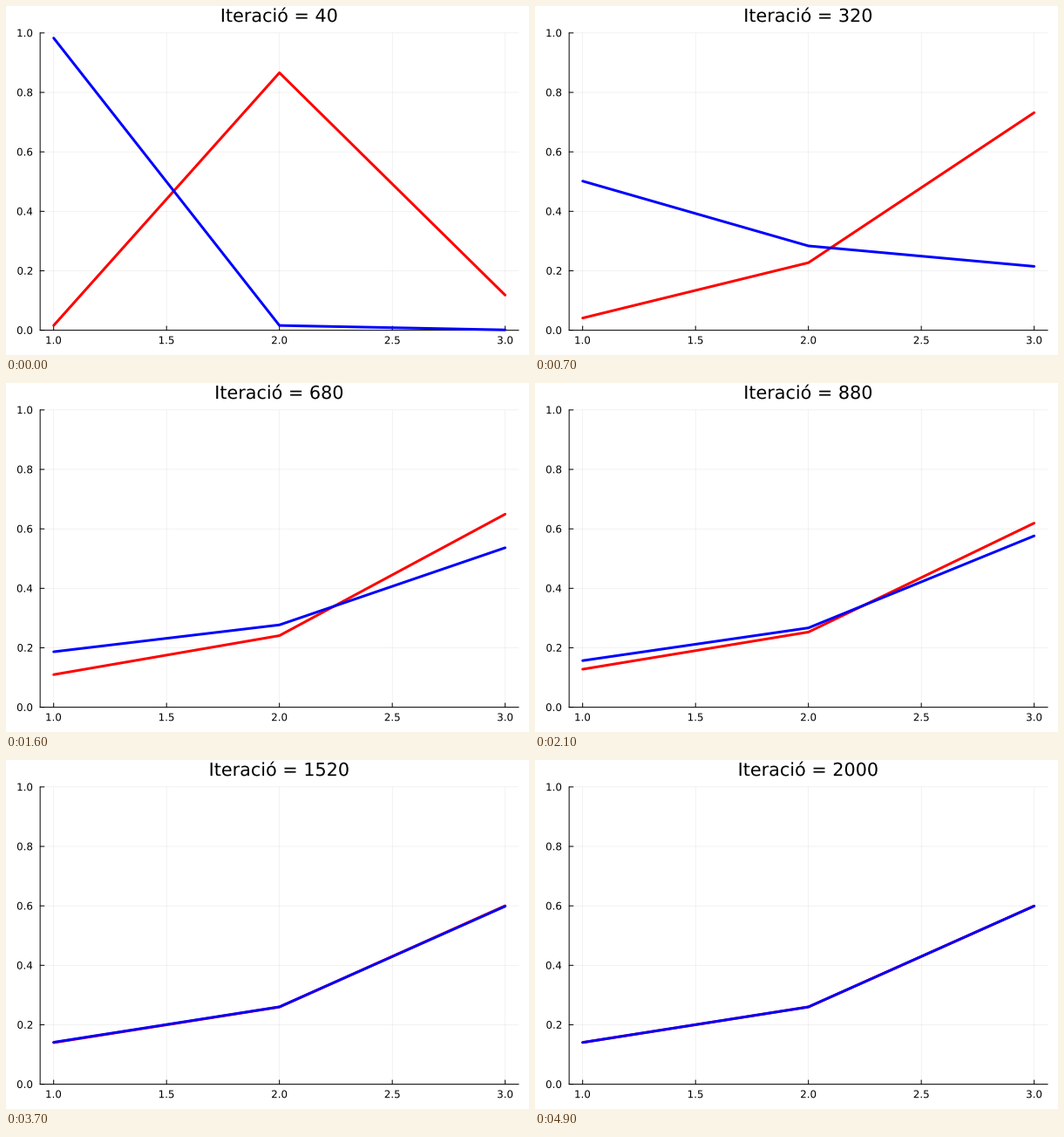
These frames come from a looping animation (600 px wide and 400 px high, 5000 ms). A matplotlib script:

```python
import numpy as np
import matplotlib.pyplot as plt
from matplotlib.animation import FuncAnimation
from matplotlib.patches import PathPatch
from matplotlib.textpath import TextPath
from matplotlib.transforms import Affine2D

WIDTH, HEIGHT, DPI = 600, 400, 100
STEPS, INTERVAL, ITERATIONS_PER_STEP = 50, 100, 40
PT = 72 / DPI  # points per pixel
LEFT, RIGHT, TOP, BOTTOM = 39.15, 588.19, 30.87, 371.61
TICK_LENGTH = 4.72
TICK_FONT, TITLE_FONT = 11.85, 20.74
DECAY = 0.2

plt.rcParams["font.family"] = "DejaVu Sans"

# Both distributions relax to the same equilibrium. Motion is described by the
# log-ratios ln(p1/p3) and ln(p2/p3), as offsets with the decay factored out.
EQUILIBRIUM = np.log(np.array([0.1405, 0.26]) / 0.5995)
KNOTS = np.array([1, 3, 5, 8, 12, 22, 50])
RED_OFFSETS = np.array([
    [-0.549, -1.99, -3.67, -5.803, -7.139, -8.47, -8.47],
    [2.829, 1.68, 0.36, -1.3585, -3.02, -4.03, -4.03],
])
BLUE_OFFSETS = np.array([
    [8.2, 8.8, 9.17, 9.323, 9.44, 9.94, 9.94],
    [3.465, 4.03, 4.37, 4.515, 4.29, 4.37, 4.37],
])


def hermite(step, values):
    """Smooth curve through (KNOTS, values), evaluated at step."""
    slopes = np.gradient(values, KNOTS)
    i = min(np.searchsorted(KNOTS, step, side="right") - 1, len(KNOTS) - 2)
    h = KNOTS[i + 1] - KNOTS[i]
    t = (step - KNOTS[i]) / h
    return ((1 + 2 * t) * (1 - t) ** 2 * values[i]
            + t * (1 - t) ** 2 * h * slopes[i]
            + t * t * (3 - 2 * t) * values[i + 1]
            + t * t * (t - 1) * h * slopes[i + 1])


def distribution(step, offsets):
    shift = np.array([hermite(step, row) for row in offsets])
    ratios = EQUILIBRIUM + shift * np.exp(-DECAY * (step - 1))
    weights = np.exp(np.append(ratios, 0))
    return weights / weights.sum()


def to_x(value):
    return LEFT + (value - 0.94) / 2.12 * (RIGHT - LEFT)


def to_y(value):
    return BOTTOM - value * (BOTTOM - TOP)


fig = plt.figure(figsize=(WIDTH / DPI, HEIGHT / DPI), dpi=DPI, facecolor="white")
ax = fig.add_axes([0, 0, 1, 1])
ax.set_xlim(0, WIDTH)
ax.set_ylim(HEIGHT, 0)
ax.axis("off")


def segment(xs, ys, width=1, color="black", **style):
    return ax.plot(xs, ys, color=color, lw=width * PT, snap=False,
                   solid_capstyle="round", solid_joinstyle="round", **style)[0]


def text_path(text, size, x, baseline, align="center"):
    """Glyph outlines whose inked extent is centred on x or ends at x."""
    path = TextPath((0, 0), text, size=size)
    ink = path.get_extents()
    anchor = ink.x1 if align == "right" else (ink.x0 + ink.x1) / 2
    return Affine2D().scale(1, -1).translate(x - anchor, baseline).transform_path(path)


def label(*args):
    patch = PathPatch(text_path(*args), facecolor="black", lw=0, snap=False)
    return ax.add_patch(patch)


def draw_axes():
    grid = dict(width=0.5, alpha=0.1)
    for value in np.arange(1, 3.01, 0.5):
        x = to_x(value)
        segment([x, x], [TOP, BOTTOM], **grid)
        segment([x, x], [BOTTOM, BOTTOM - TICK_LENGTH])
        label(f"{value:.1f}", TICK_FONT, x, 387.21)
    for value in np.arange(0, 1.01, 0.2):
        y = to_y(value)
        segment([LEFT, RIGHT], [y, y], **grid)
        segment([LEFT, LEFT + TICK_LENGTH], [y, y])
        label(f"{value:.1f}", TICK_FONT, 30.15, y + 4.32, "right")
    segment([LEFT, LEFT], [TOP, BOTTOM])
    segment([LEFT, RIGHT], [BOTTOM, BOTTOM])


def title_path(step):
    text = f"Iteració = {step * ITERATIONS_PER_STEP}"
    return text_path(text, TITLE_FONT, (LEFT + RIGHT) / 2, 18.14)


draw_axes()
title = ax.add_patch(PathPatch(title_path(1), facecolor="black", lw=0, snap=False))
state_x = to_x(np.array([1, 2, 3]))
curves = [
    (segment(state_x, [BOTTOM] * 3, 3, color, zorder=3), offsets)
    for color, offsets in (("#ff0000", RED_OFFSETS), ("#0000ff", BLUE_OFFSETS))
]


def update(frame):
    step = frame + 1
    title.set_path(title_path(step))
    for curve, offsets in curves:
        curve.set_ydata(to_y(distribution(step, offsets)))
    return [title] + [curve for curve, _ in curves]


animation = FuncAnimation(fig, update, frames=STEPS, interval=INTERVAL,
                          repeat=True, repeat_delay=0)
plt.show()
```
